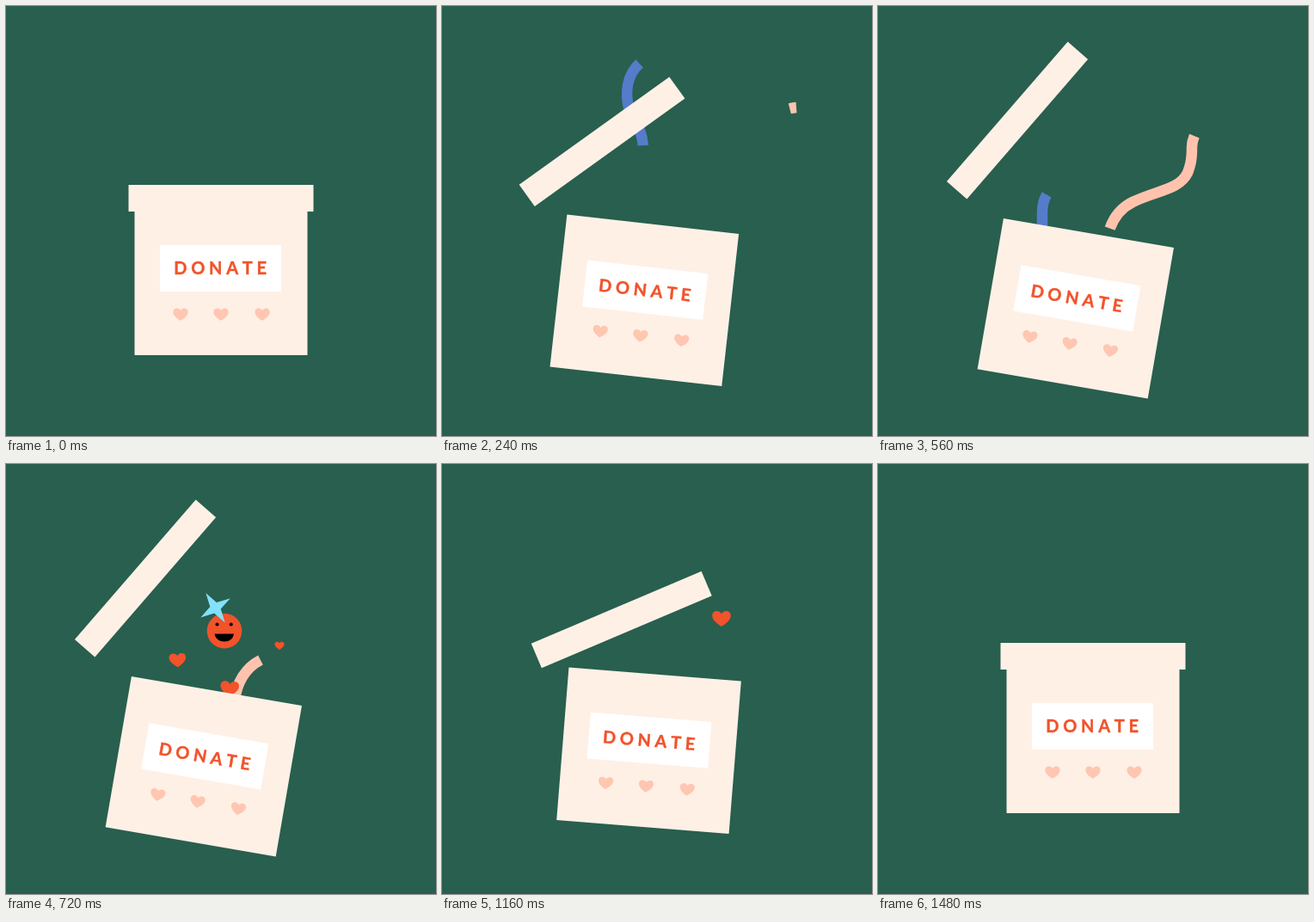
An HTML page that plays this animation: 500x500 px, repeating every 1560 ms.

```html
<!DOCTYPE html>
<html lang="en">
<head>
<meta charset="utf-8">
<title>Donation box</title>
<style>
  html, body { margin: 0; width: 100%; height: 100%; overflow: hidden; background: #285f4f; }
  svg { display: block; width: 100%; height: 100%; }
  .ribbon { fill: none; stroke-width: 12.5; }
  .label {
    font: 700 20px Lato, "Open Sans", sans-serif;
    letter-spacing: 4.7px; font-kerning: none;
    fill: #f1532b; stroke: #f1532b; stroke-width: .4;
  }
</style>
</head>
<body>
<svg viewBox="0 0 500 500">
  <defs>
    <path id="heart" d="M0 .85C-.5 .55-1 .15-1-.3C-1-.65-.75-.8-.5-.8C-.25-.8-.1-.68 0-.5C.1-.68 .25-.8 .5-.8C.75-.8 1-.65 1-.3C1 .15 .5 .55 0 .85Z"/>
  </defs>
  <rect width="500" height="500" fill="#285f4f"/>
  <path id="blue" class="ribbon" stroke="#557bcb"
    d="M233 64C216 77 212 98 217.5 120C221 130 234 143 234 166C234 188 222 198 208 207C196 215 191 227 191 240V275"/>
  <path id="pink" class="ribbon" stroke="#ffc3ad"
    d="M412 118C385 120 365 146 365 164C365 180 363 186 360 194C350 214 325 214 296 228C278 237 268 255 266 275V300"/>
  <g id="smiley">
    <circle r="20.3" fill="#f1532b"/>
    <circle cx="-8.5" cy="-7.5" r="2"/>
    <circle cx="7.7" cy="-7.5" r="2"/>
    <path d="M-11.5 3.5H11C10 9.5 5.5 12.5 0 12.5S-10.5 9.5-11.5 3.5Z"/>
  </g>
  <path id="star" fill="#82e1fb" d="M20.5 0L4.5 4.5L0 20.5L-4.5 4.5L-20.5 0L-4.5-4.5L0-20.5L4.5-4.5Z"/>
  <g id="hearts" fill="#f1532b"></g>
  <g id="box">
    <rect x="-100.5" y="-89" width="201" height="178" fill="#fef0e5"/>
    <rect x="-71" y="-39" width="141" height="54" fill="#fff"/>
    <text class="label" x="-54.7" y="-4.7">DONATE</text>
    <g fill="#ffc6b1">
      <use href="#heart" transform="translate(-47 41.5) scale(8.6)"/>
      <use href="#heart" transform="translate(0 41.5) scale(8.6)"/>
      <use href="#heart" transform="translate(48 41.5) scale(8.6)"/>
    </g>
  </g>
  <rect id="lid" x="-107.5" y="-15.5" width="215" height="31" fill="#fef0e5"/>
</svg>
<script>
const LOOP = 1560, STEP = 40;
const $ = id => document.getElementById(id);
const clamp = v => Math.max(0, Math.min(1, v));
const mix = (a, b, p) => a + (b - a) * p;
const ramp = (t, from, to) => clamp((t - from) / (to - from));

// Cubic bezier easing with handles (x1, 0) and (x2, 1).
const bezier = (x1, x2) => x => {
  if (x <= 0 || x >= 1) return clamp(x);
  let lo = 0, hi = 1, s;
  for (let i = 0; i < 24; i++) {
    s = (lo + hi) / 2;
    const bx = 3 * (1 - s) ** 2 * s * x1 + 3 * (1 - s) * s * s * x2 + s ** 3;
    if (bx < x) lo = s; else hi = s;
  }
  return s * s * (3 - 2 * s);
};
const openMove = bezier(.4, .28), openTurn = bezier(.45, .35), shut = bezier(.2, .44);

// x, y, start of the fall, tilt
const drops = [
  [191, 190, 240, 0],
  [199.5, 206, 620, -3],
  [260, 205, 560, 4],
  [318, 204, 663, 0],
  [318, 167, 850, 0],
  [265, 230, 887, 8],
  [325, 153, 1050, 0]
].map(([x, y, start, tilt]) => {
  const el = document.createElementNS("http://www.w3.org/2000/svg", "use");
  el.setAttribute("href", "#heart");
  $("hearts").append(el);
  return { el, x, y, start, tilt };
});

const ribbons = [
  { el: $("blue"), head: 62, tail: 181 },
  { el: $("pink"), head: 226, tail: 345 }
].map(r => ({ ...r, size: r.el.getTotalLength() }));

function place(el, x, y, turn = 0, scale = 1) {
  el.setAttribute("visibility", scale > 0 ? "visible" : "hidden");
  el.setAttribute("transform", `translate(${x} ${y}) rotate(${turn}) scale(${scale})`);
}

function drawRibbon({ el, head, tail, size }, t) {
  const u = Math.max(0, t - head), v = Math.max(0, t - tail);
  const front = Math.min(size, .55 * u + .0003 * u * u);
  const back = Math.min(size, .00125 * v * v);
  el.setAttribute("visibility", front > back ? "visible" : "hidden");
  el.setAttribute("stroke-dasharray", `0 ${back} ${Math.max(0, front - back)} 999`);
}

function draw(t) {
  const closing = shut(ramp(t, 960, 1480));
  const move = openMove(ramp(t, 0, 480)) - closing;
  const turn = openTurn(ramp(t, 0, 480)) - closing;
  place($("box"), mix(250, 229.8, move), mix(317, 351.7, move), 9.8 * turn);
  place($("lid"), mix(250, 162, move), mix(223.5, 133, move), -49.1 * move);

  ribbons.forEach(r => drawRibbon(r, t));

  for (const { el, x, y, start, tilt } of drops) {
    const age = Math.max(0, t - start), fall = y + .0022 * age * age;
    place(el, x, fall, tilt, fall < 330 ? 10.8 * clamp(age / 110) : 0);
  }

  const drift = (t - 720) / 240;
  const age = Math.max(0, t - 660);
  place($("smiley"), 254 - 4 * drift, 193 + .00031 * age * age, 0,
    t < 1280 ? ramp(t, 600, 700) : 0);

  const fade = 1 - ramp(t, 960, 1080);
  place($("star"), 243.5 - 2.5 * drift, 167.3, -33 + 10 * drift,
    ramp(t, 600, 700) * (1 - .15 * clamp(drift)) * fade);
  $("star").setAttribute("opacity", (1 - .14 * clamp(drift)) * fade);
}

const begin = performance.now();
function tick() {
  const t = (performance.now() - begin) % LOOP;
  draw(Math.min(1480, Math.floor(t / STEP) * STEP));
  requestAnimationFrame(tick);
}
tick();
</script>
</body>
</html>
```
